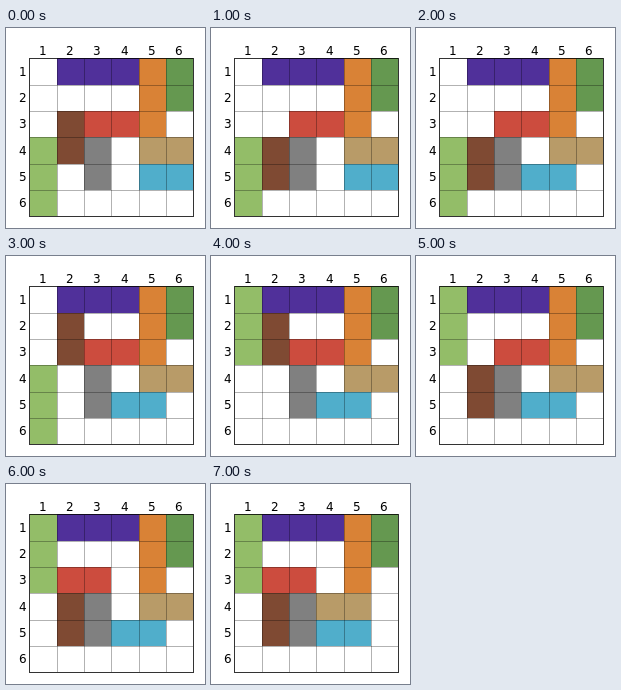
An HTML page for the animation above (8 s loop, 199 by 200 pixels).

```html
<!DOCTYPE html>
<html lang="en">
<head>
<meta charset="utf-8">
<title>Sliding blocks</title>
<style>
  html, body { margin: 0; width: 100%; height: 100%; overflow: hidden; background: #fff; }
  svg { display: block; width: 100%; height: 100%; }
  text { font: 12px "DejaVu Sans", sans-serif; fill: #000; }
  .grid { stroke: #000; stroke-opacity: .3; }
  .frame { fill: none; stroke: #000; stroke-opacity: .8; }
</style>
</head>
<body>
<svg id="board" viewBox="0 0 199 200"></svg>
<script>
const LOOP = 8000;
const X = [24, 51, 78, 105, 133, 160, 187];
const Y = [30, 57, 83, 109, 136, 162, 188];

// Steps are [time, column, row]; each position holds until the next one.
const blocks = [
  { color: '#50309a', w: 3, h: 1, steps: [[0, 1, 0]] },
  { color: '#d98236', w: 1, h: 3, steps: [[0, 4, 0]] },
  { color: '#659850', w: 1, h: 2, steps: [[0, 5, 0]] },
  { color: '#808080', w: 1, h: 2, steps: [[0, 2, 3]] },
  { color: '#7f4a33', w: 1, h: 2, steps: [[0, 1, 2], [1000, 1, 3], [3000, 1, 1], [5000, 1, 3]] },
  { color: '#50aecb', w: 2, h: 1, steps: [[0, 4, 4], [2000, 3, 4]] },
  { color: '#93bd68', w: 1, h: 3, steps: [[0, 0, 3], [4000, 0, 0]] },
  { color: '#cc4c3e', w: 2, h: 1, steps: [[0, 2, 2], [6000, 1, 2]] },
  { color: '#b89b68', w: 2, h: 1, steps: [[0, 4, 3], [7000, 3, 3]] }
];

const board = document.getElementById('board');

function add(tag, attrs, text) {
  const el = document.createElementNS('http://www.w3.org/2000/svg', tag);
  for (const key in attrs) el.setAttribute(key, attrs[key]);
  if (text) el.textContent = text;
  return board.appendChild(el);
}

function place(block, col, row) {
  return {
    x: X[col] + 'px',
    y: Y[row] + 'px',
    width: X[col + block.w] - X[col] + 'px',
    height: Y[row + block.h] - Y[row] + 'px'
  };
}

for (const block of blocks) {
  const frames = block.steps.map(([time, col, row]) =>
    ({ ...place(block, col, row), offset: time / LOOP, easing: 'step-end' }));
  const rect = add('rect', { fill: block.color, ...place(block, ...block.steps[0].slice(1)) });
  if (frames.length > 1) {
    frames.push({ ...frames[frames.length - 1], offset: 1 });
    rect.animate(frames, { duration: LOOP, iterations: Infinity });
  }
}

for (let i = 1; i < 6; i++) {
  add('path', { class: 'grid', d: `M${X[i] + .5} 31V188` });
  add('path', { class: 'grid', d: `M24 ${Y[i] + .5}H187` });
}
add('rect', { class: 'frame', x: 23.5, y: 30.5, width: 164, height: 158 });

// Labels start on whole pixels so the digits stay sharp.
for (let i = 0; i < 6; i++) {
  add('text', { x: Math.floor((X[i] + X[i + 1]) / 2 - 3.8), y: 27 }, i + 1);
  add('text', { x: 13, y: Math.round((Y[i] + Y[i + 1]) / 2 + 4.4) }, i + 1);
}
</script>
</body>
</html>
```
